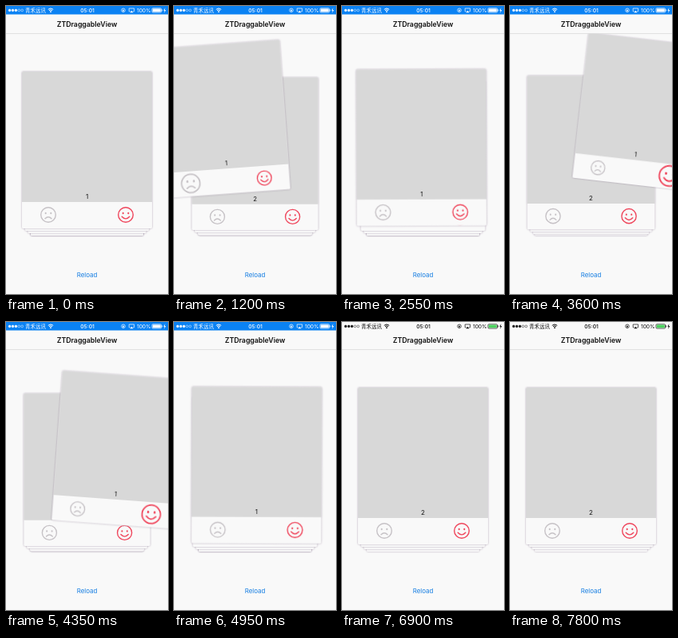
These frames come from a looping animation (203 by 360 pixels, 8 s). An HTML page:

```html
<!DOCTYPE html>
<html lang="zh">
<head>
<meta charset="utf-8">
<title>ZTDraggableView</title>
<style>
  html, body { margin: 0; width: 100%; height: 100%; overflow: hidden; background: #f9f9f9; }
  svg { display: block; width: 203px; height: 360px; }
  text { font-family: Inter, Roboto, sans-serif; text-anchor: middle; }
  .card { filter: drop-shadow(0 .4px 1.2px rgba(65, 35, 75, .38)); }
  .face { fill: none; stroke-width: 1.4; stroke-linecap: round; }
  .sad { stroke: #c6c2c6; }
  .happy { stroke: #ef465c; }
  #status { color: #fff; }
  #status text { fill: currentColor; font-size: 6.7px; }
  #status .carrier { font: 6.5px "Noto Sans CJK SC", "Noto Sans CJK", sans-serif; }
  .line { fill: none; stroke: currentColor; stroke-width: .7; }
</style>
</head>
<body>
<svg viewBox="0 0 203 360">
  <rect width="203" height="360" fill="#f9f9f9"/>
  <g id="deck"></g>
  <text x="101.5" y="338.9" font-size="7.9" fill="#147de2">Reload</text>

  <rect width="203" height="34.5" fill="#f9f9f9" fill-opacity=".96"/>
  <path d="M0 34.5H203" stroke="#d2d2d2" stroke-width=".6"/>
  <text x="101.5" y="25.6" font-size="8.75" font-weight="600" fill="#111">ZTDraggableView</text>

  <g id="status">
    <rect id="bar" width="203" height="10.5" fill="#0b82f3"/>
    <g id="signal"></g>
    <text class="carrier" x="37" y="7.8">青禾远讯</text>
    <g class="line">
      <path d="M52.8 4.3Q56 1.6 59.2 4.3M54 5.7Q56 4 58 5.7" stroke-width="1"/>
      <circle cx="147" cy="5.3" r="2.3"/>
      <path d="M155.6 6.8H154.2V3H160.6V6.8H159.2"/>
      <rect x="183" y="2.8" width="11.6" height="5.2" rx="1"/>
    </g>
    <g fill="currentColor">
      <circle cx="56" cy="7.2" r=".9"/>
      <rect x="146" y="4.8" width="2" height="1.6"/>
      <path d="M155.3 8.2L157.4 5.7L159.5 8.2Z"/>
      <rect x="195" y="4.4" width=".8" height="2"/>
      <path d="M199.4 2.2L197.3 5.8H198.7L198.1 8.8L200.4 4.9H198.9Z"/>
    </g>
    <rect id="charge" x="183.8" y="3.6" width="10" height="3.6" rx=".4"/>
    <text x="102" y="7.8" font-weight="500">05:01</text>
    <text x="172.8" y="7.8" font-size="6.5">100%</text>
  </g>
</svg>
<script>
const LOOP = 8000, STEP = 150, WHITE_BAR = 6750;
const CENTER = { x: 101.5, y: 180 }, HALF = { w: 81.5, h: 98 };
const $ = id => document.getElementById(id);

// time, x and y of the dragged card
const path = [
  [0, 0, 0], [750, 0, 0], [900, -6, -7], [1050, -22, -23], [1200, -40, -38.6],
  [1500, -60, -50], [1800, -64, -52], [1950, -58, -48], [2250, -24, -23],
  [2400, -9, -10], [2550, -2, -3], [2850, 0, 0], [3150, 0, 0], [3300, 10, -8],
  [3600, 62, -47.3], [3750, 74, -56], [4200, 78, -62], [4350, 40, -20],
  [4500, 16, -8], [4650, 6, -3], [5100, 0, 0], [5700, 0, 0],
  [5850, -58.7, -47], [6000, -140, -62], [6300, -330, -90], [LOOP, -330, -90]
];

const face = (kind, mouth) => `<g class="face ${kind}">
  <circle r="9.3"/><path d="M-3.3 -2.3v.5M3.3 -2.3v.5" stroke-width="2"/><path d="${mouth}"/></g>`;

const cardMarkup = n => `<g class="card">
  <rect x="-81.5" y="-98" width="163" height="196" rx="1.5" fill="#f9f9f9"/>
  <path d="M-81.5 65V-96.5q0 -1.5 1.5 -1.5H80q1.5 0 1.5 1.5V65Z" fill="#d8d8d8"/>
  <text y="60.8" font-size="8" fill="#111">${n}</text>
  ${face("sad", "M-4 4.8Q0 .6 4 4.8")}${face("happy", "M-4.8 2.2Q0 7.6 4.8 2.2")}</g>`;

$("deck").innerHTML = [5, 4, 3, 2, 1].map(cardMarkup).join("");
const cards = [...$("deck").children].reverse();

$("signal").innerHTML = [0, 1, 2, 3, 4].map(i =>
  `<circle cx="${4.6 + i * 3.9}" cy="5.4" r="1.4" stroke="currentColor" stroke-width=".5"
    fill="${i < 3 ? "currentColor" : "none"}"/>`).join("");

function dragAt(t) {
  const i = path.findIndex(k => k[0] > t);
  const [t0, x0, y0] = path[i - 1], [t1, x1, y1] = path[i];
  const u = (t - t0) / (t1 - t0);
  return { x: x0 + (x1 - x0) * u, y: y0 + (y1 - y0) * u };
}

function place(card, x, y, angle, scale, sad = 1, happy = 1) {
  card.setAttribute("transform",
    `translate(${CENTER.x + x} ${CENTER.y + y}) rotate(${angle}) scale(${scale})`);
  card.querySelector(".sad").setAttribute("transform", `translate(-48.5 81) scale(${sad})`);
  card.querySelector(".happy").setAttribute("transform", `translate(48.5 81) scale(${happy})`);
}

function draw(t) {
  const { x, y } = dragAt(t);
  const pull = Math.min(Math.abs(x), 85);
  const grow = 1 + pull * .0075;
  const angle = Math.sign(x) * pull * .105;
  place(cards[0], x, y, angle, 1 - pull * .00117, x < 0 ? grow : 1, x > 0 ? grow : 1);

  const rise = Math.min(1, Math.abs(x) / 110);
  cards.slice(1).forEach((card, i) => {
    const depth = Math.min(3, i + 1 - rise);
    const scale = 1 - .045 * depth;
    place(card, 0, HALF.h * (1 - scale) + 3 * depth, 0, scale);
  });

  const white = t >= WHITE_BAR;
  $("bar").setAttribute("fill", white ? "#f9f9f9" : "#0b82f3");
  $("status").style.color = white ? "#111" : "#fff";
  $("charge").setAttribute("fill", white ? "#4cd35f" : "#fff");
}

const start = performance.now();
function tick() {
  const t = (performance.now() - start) % LOOP;
  draw(Math.floor(t / STEP) * STEP);
  requestAnimationFrame(tick);
}
tick();
</script>
</body>
</html>
```
